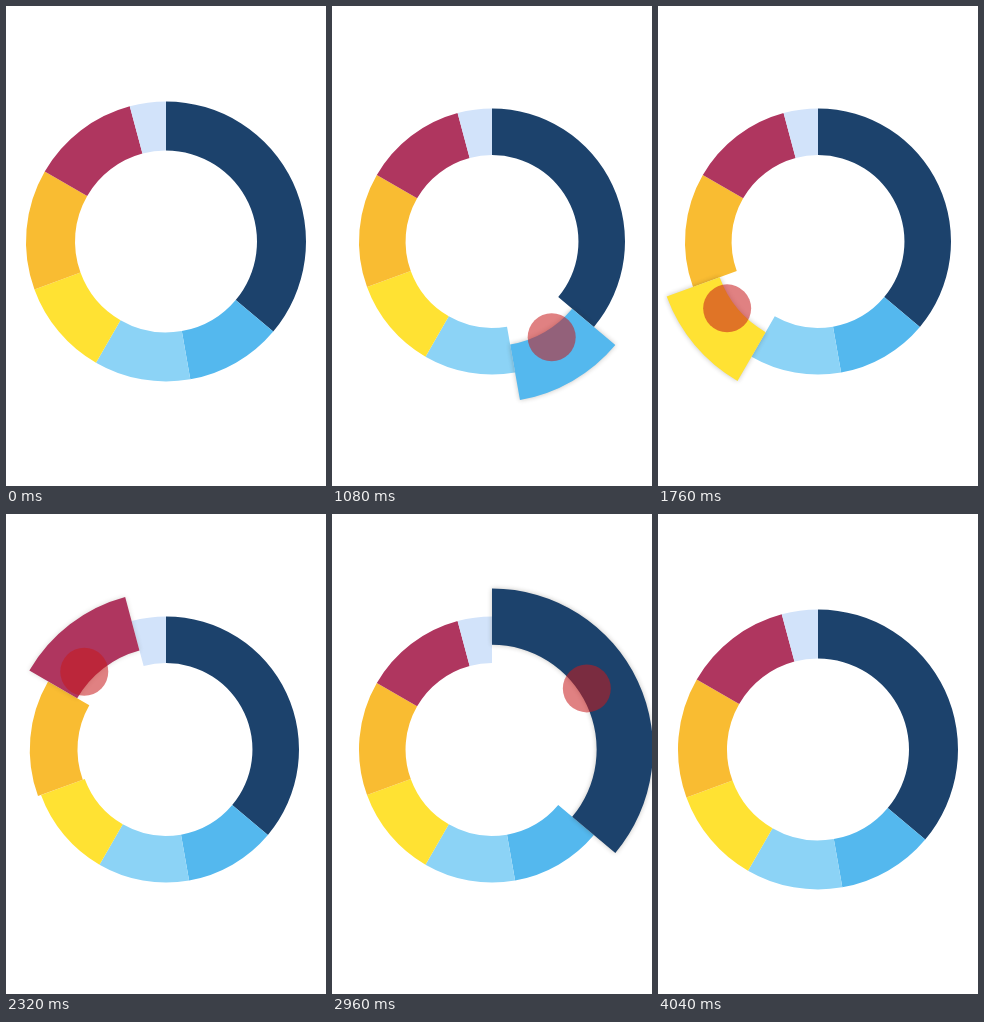
An HTML page that plays this animation: 320x480 px, repeating every 4.08 s.

```html
<!DOCTYPE html>
<html lang="en">
<head>
<meta charset="utf-8">
<title>Donut chart</title>
<style>
  html, body { margin: 0; width: 100%; height: 100%; overflow: hidden; background: #fff; }
  svg { display: block; width: 100vw; height: 100vh; }
</style>
</head>
<body>
<svg id="chart" viewBox="0 0 320 480">
  <defs>
    <filter id="blur" filterUnits="userSpaceOnUse" x="-40" y="0" width="400" height="480">
      <feGaussianBlur stdDeviation="2.6"/>
    </filter>
  </defs>
  <g id="ring"></g>
  <circle id="finger" r="24" fill="#c61a1c"/>
</svg>
<script>
const LOOP = 4080, PRESS = 280, RELEASE = 3680, POP_TIME = 100;
const CX = 160, CY = 235.5, OUTER = 140, INNER = 91, DRAG_RADIUS = 112.8;

// Angles in degrees, clockwise from the top.
const slices = [
  { from: 0, to: 130, color: '#1c426c' },
  { from: 130, to: 170, color: '#54b8ee' },
  { from: 170, to: 210, color: '#8cd3f6' },
  { from: 210, to: 250, color: '#ffe233' },
  { from: 250, to: 300, color: '#f9bc32' },
  { from: 300, to: 345, color: '#af365f' },
  { from: 345, to: 360, color: '#d2e3fa', fixed: true },
];

// Time and angle of the finger along its drag.
const drag = [
  [PRESS, 137], [600, 137], [1080, 148], [1360, 174], [1620, 210], [1760, 233.5],
  [2243, 300], [2320, 313.4], [2587, 360], [2640, 368.1], [2960, 417.1],
  [3400, 466], [RELEASE, 476],
];

const clamp = (v, lo = 0, hi = 1) => Math.min(hi, Math.max(lo, v));
const ease = p => (1 - Math.cos(Math.PI * clamp(p))) / 2;
const pulse = (t, on, off) => ease((t - on) / POP_TIME) - ease((t - off) / POP_TIME);

function polar(r, deg) {
  const a = deg * Math.PI / 180;
  return [CX + r * Math.sin(a), CY - r * Math.cos(a)];
}

function slope(i) {
  if (i === 0 || i === drag.length - 1) return 0;
  const [t0, a0] = drag[i - 1], [t1, a1] = drag[i + 1];
  return (a1 - a0) / (t1 - t0);
}

function fingerAngle(time) {
  const t = clamp(time, PRESS, RELEASE);
  let i = 0;
  while (i < drag.length - 2 && t > drag[i + 1][0]) i++;
  const [t0, a0] = drag[i], [t1, a1] = drag[i + 1];
  const span = t1 - t0, u = (t - t0) / span, v = 1 - u;
  return a0 * v * v * (1 + 2 * u) + a1 * u * u * (3 - 2 * u)
    + span * u * v * (v * slope(i) - u * slope(i + 1));
}

function timeAtAngle(angle) {
  let lo = PRESS, hi = RELEASE;
  for (let n = 0; n < 30; n++) {
    const mid = (lo + hi) / 2;
    if (fingerAngle(mid) < angle) lo = mid; else hi = mid;
  }
  return hi;
}

function slicePath({ from, to }, scale) {
  const R = OUTER * scale, r = INNER * scale;
  return `M${polar(R, from)}A${R} ${R} 0 0 1 ${polar(R, to)}`
    + `L${polar(r, to)}A${r} ${r} 0 0 0 ${polar(r, from)}Z`;
}

function add(parent, tag, attrs = {}) {
  const el = document.createElementNS('http://www.w3.org/2000/svg', tag);
  for (const key in attrs) el.setAttribute(key, attrs[key]);
  return parent.appendChild(el);
}

const ring = document.getElementById('ring');
const finger = document.getElementById('finger');

for (const s of slices) {
  // The first slice is reached after a full turn.
  const turn = s.from === 0 ? 360 : 0;
  s.enter = timeAtAngle(s.from + turn);
  s.leave = timeAtAngle(s.to + turn);
  s.group = add(ring, 'g');
  s.shadow = add(s.group, 'path', { fill: '#2a2418', filter: 'url(#blur)' });
  s.shape = add(s.group, 'path', { fill: s.color });
}

function render(t) {
  const pressed = pulse(t, PRESS, RELEASE);
  for (const s of slices) {
    s.pop = s.fixed ? 0 : pulse(t, s.enter, s.leave);
    const d = slicePath(s, 1 - 0.05 * pressed + 0.2 * s.pop);
    s.shape.setAttribute('d', d);
    s.shadow.setAttribute('d', d);
    s.shadow.setAttribute('opacity', 0.27 * clamp((s.pop - 0.7) / 0.3));
  }
  [...slices].sort((a, b) => a.pop - b.pop).forEach(s => ring.appendChild(s.group));

  const [x, y] = polar(DRAG_RADIUS, fingerAngle(t));
  finger.setAttribute('cx', x);
  finger.setAttribute('cy', y);
  finger.setAttribute('opacity', 0.55 * pressed);
}

const start = performance.now();
function tick() {
  render((performance.now() - start) % LOOP);
  requestAnimationFrame(tick);
}
tick();
</script>
</body>
</html>
```
